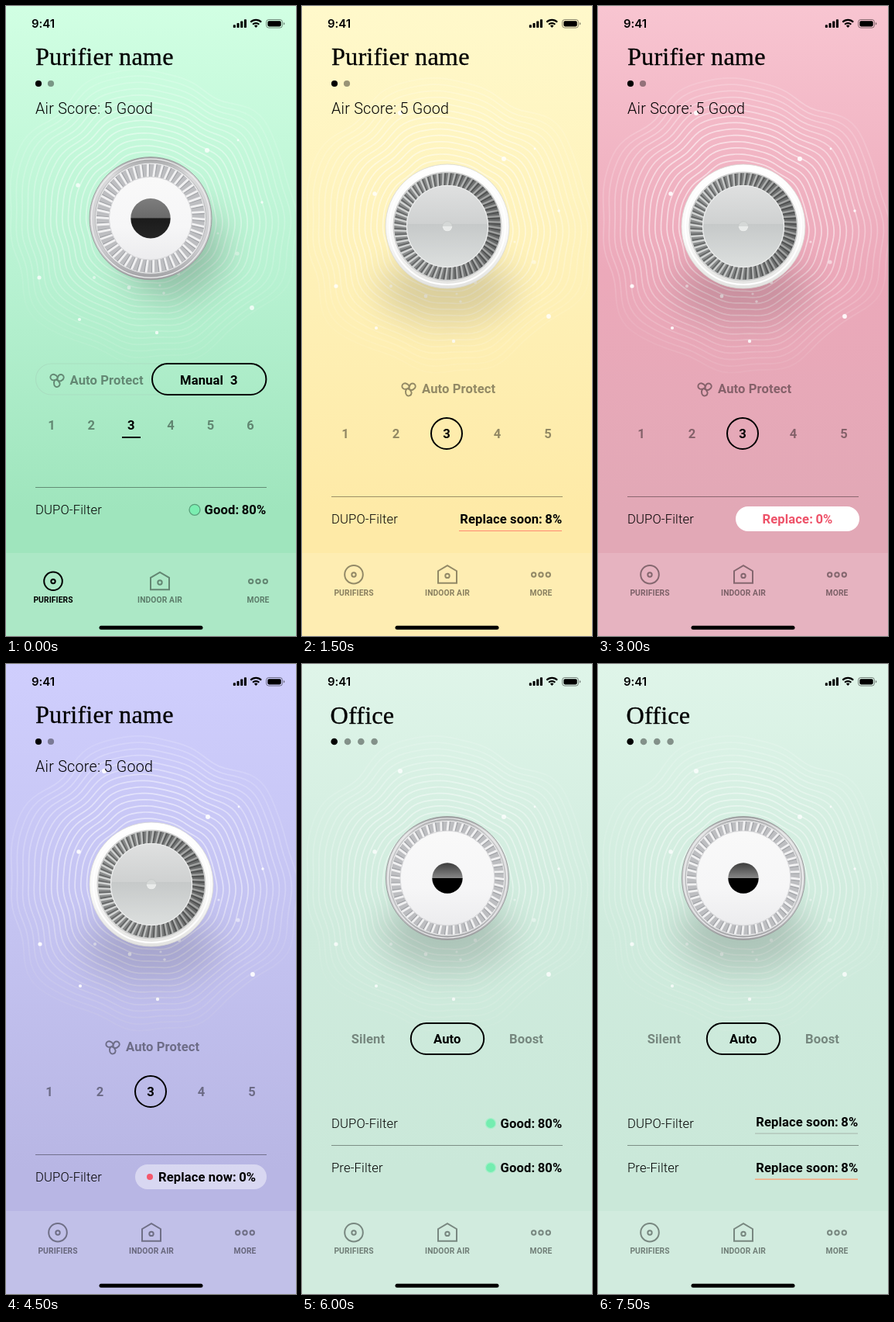
An HTML page for the animation above (8 s loop, 375 px wide and 812 px high).

```html
<!DOCTYPE html>
<html lang="en">
<head>
<meta charset="utf-8">
<title>Air purifier</title>
<style>
  html, body { margin: 0; width: 100%; height: 100%; overflow: hidden; }
  svg { display: block; width: 375px; height: 812px; }
  text { font-family: Roboto, Inter, sans-serif; font-size: 16.6px; font-weight: 700; letter-spacing: .1px; }
  .title { font-family: "Liberation Serif", serif; font-weight: 400; font-size: 32.3px; letter-spacing: .15px; stroke: #000; stroke-width: .3px; }
  .light { font-weight: 300; letter-spacing: .15px; }
  .score { font-weight: 300; font-size: 19.7px; letter-spacing: .25px; }
  .tab { font-size: 10.3px; font-weight: 600; }
  .clock { font-family: Inter, sans-serif; font-size: 15px; font-weight: 600; letter-spacing: -.05px; }
</style>
</head>
<body>
<svg id="stage" viewBox="0 0 375 812" xmlns="http://www.w3.org/2000/svg"></svg>
<script>
const LOOP = 8000, HOLD = 1500;
const FILTER = 'DUPO-Filter';
const stage = document.getElementById('stage');

// Drawing helpers; a thin space follows colons
const text = (x, y, str, o = {}) =>
  `<text x="${x}" y="${y}" class="${o.cls || ''}" text-anchor="${o.at || 'start'}" fill="${o.fill || '#000'}" opacity="${o.op || 1}">${String(str).replace(': ', ':\u2009')}</text>`;
const circle = (x, y, r, fill, extra = '') => `<circle cx="${x}" cy="${y}" r="${r}" fill="${fill}" ${extra}/>`;
const rect = (x, y, w, h, r, fill, extra = '') =>
  `<rect x="${x}" y="${y}" width="${w}" height="${h}" rx="${r}" fill="${fill}" ${extra}/>`;
const line = (x1, x2, y, color, w = 1, extra = '') =>
  `<path d="M${x1} ${y}H${x2}" stroke="${color}" stroke-width="${w}" ${extra}/>`;
const pen = (w, color = '#000') => `stroke="${color}" stroke-width="${w}"`;
const times = (n, fn) => Array.from({ length: n }, (_, i) => fn(i)).join('');
const stops = list => list.map(([at, color, op = 1]) =>
  `<stop offset="${at}" stop-color="${color}" stop-opacity="${op}"/>`).join('');
const vertical = (id, ...list) =>
  `<linearGradient id="${id}" x1="0" y1="0" x2="0" y2="1">${stops(list)}</linearGradient>`;

function defs(s) {
  const [top, mid, low] = s.bg;
  return `<defs>
    ${vertical('bg', [0, top], [.42, mid], [.8, low], [1, low])}
    ${vertical('rim', [0, '#a0a1a3'], [.15, '#dadadb'], [.75, '#cccccf'], [1, '#a0a0a3'])}
    ${vertical('disc', [0, '#f9f9f9'], [.6, '#f6f6f7'], [1, '#ececee'])}
    ${vertical('shell', [0, '#ffffff'], [.6, '#f8f8f7'], [1, '#e3e3e1'])}
    ${vertical('cap', [0, '#dfe0e0'], [.47, '#cfd1d1'], [.475, '#c6c9c9'], [1, '#dcdfde'])}
    ${vertical('lens', [0, '#7d7d7d'], [.49, '#6a6a6a'], [.5, '#1b1b1b'], [1, '#252525'])}
    ${vertical('dark', [0, '#3c3c3c'], [.49, '#868686'], [.5, '#000'], [1, '#000'])}
    <linearGradient id="shade">${stops([[.1, '#000', 0], [1, '#000', .25]])}</linearGradient>
    <linearGradient id="wave" gradientUnits="userSpaceOnUse" x1="0" y1="90" x2="0" y2="480">
      ${stops([[0, '#fff', .6], [.5, '#fff', .55], [1, s.wave, .5]])}</linearGradient>
    <radialGradient id="fade" gradientUnits="userSpaceOnUse" cx="188" cy="284" r="205">
      ${stops([[0, '#fff'], [.6, '#fff'], [1, '#fff', .12]])}</radialGradient>
    <mask id="soft" maskUnits="userSpaceOnUse" x="-40" y="40" width="455" height="480">
      ${rect(-40, 40, 455, 480, 0, 'url(#fade)')}</mask>
    <filter id="blur" x="-60%" y="-60%" width="220%" height="220%"><feGaussianBlur stdDeviation="22"/></filter>
  </defs>`;
}

function ring(k) {
  const R = 84 + k * 7.9, a = .02 + k * .0018;
  let d = '';
  for (let i = 0; i < 150; i++) {
    const q = i / 150 * Math.PI * 2;
    const bump = Math.sin(3 * q + .9 + k * .03) * .4 + Math.sin(6 * q - .6) * .75 +
      Math.sin(10 * q + 1.7 + k * .07) * .4 + Math.sin(15 * q + k * .1) * .16;
    const r = R * (1 + a * bump);
    d += (i ? 'L' : 'M') + (188 + r * Math.cos(q)).toFixed(1) + ' ' + (284 + r * Math.sin(q)).toFixed(1);
  }
  return `<path d="${d}Z"/>`;
}
const rings = times(14, ring);

const sparks = [
  [127, 138, 3], [261, 197, 3], [301, 184, 1.4], [94, 242, 2.7], [332, 264, 1.7],
  [300, 330, 2.6, .5], [44, 361, 2.6], [115, 361, 2, .6], [160, 374, 2.4, .7], [200, 371, 1.6, .5],
  [205, 381, 1.8, .6], [96, 415, 2.1], [319, 400, 2.9], [196, 432, 2.2], [224, 356, 2.2, .6], [275, 304, 1.6, .5]
];

function waves(s) {
  const [dx, dy] = s.shift || [0, 0];
  const from = s.shift ? 1 : 0;
  return `<g transform="translate(${dx} ${dy})">
    <g mask="url(#soft)" fill="none" stroke="url(#wave)" stroke-width="1.7" opacity="${s.waveOp}">${rings}</g>
    ${sparks.slice(from).map(([x, y, r, op = .9]) => circle(x, y, r, '#fff', `opacity="${op * s.sparkOp}"`)).join('')}
  </g>`;
}

function shadow(x, y, rx, ry, op) {
  return `<ellipse cx="${x}" cy="${y}" rx="${rx}" ry="${ry}" opacity="${op}" filter="url(#blur)"/>`;
}

// Radial blades between r0 and r1, tilted by skew degrees
function blades(n, r0, r1, w, color, skew = 0, turn = 0) {
  return `<g stroke="${color}" stroke-width="${w}">` + times(n, i => {
    const a = (i * 360 / n + turn) * Math.PI / 180, b = a + skew * Math.PI / 180;
    const p = (r, q) => (r * Math.cos(q)).toFixed(2) + ' ' + (r * Math.sin(q)).toFixed(2);
    return `<path d="M${p(r0, a)}L${p(r1, b)}"/>`;
  }) + '</g>';
}

function eyeDevice(x, y, r, r0, r1, n, eye, fill) {
  const mid = (r0 + r1) / 2, span = r1 - r0;
  return `<g transform="translate(${x} ${y})">
    ${circle(0, 0, r, 'url(#rim)', pen(1, '#9b9d9e'))}
    ${circle(0, 0, r - 2.5, 'none', pen(1.2, '#f0f0f1'))}
    ${circle(0, 0, r1 + 1.6, '#ededee', pen(.8, '#aeb0b2'))}
    ${circle(0, 0, mid, 'none', pen(span, '#bdbec1'))}
    ${blades(n, r0, r1, 1.2, '#a0a2a6', 1, 1.8)}
    ${blades(n, r0, r1, 2.8, '#f1f1f2', 1)}
    ${circle(0, 0, r0, 'url(#disc)', pen(.8, '#d4d4d6'))}
    ${circle(0, 0, eye, fill)}
  </g>`;
}

function knobDevice() {
  return `<g transform="translate(188 284)">
    ${circle(0, 0, 80, 'url(#shell)', pen(.8, '#d9d9d4'))}
    ${circle(0, 0, 75, 'none', pen(2, '#fff'))}
    ${circle(0, 0, 70, '#dcdddc', pen(.8, '#c4c5c4'))}
    ${circle(0, 0, 61, 'none', pen(15.5, '#8b8d8d'))}
    ${blades(56, 53, 68.6, 1.7, '#666868', 2, 2.2)}
    ${blades(56, 53, 69.5, 2.3, '#d2d4d3', 2)}
    ${circle(0, 0, 61, 'none', pen(16, 'url(#shade)'))}
    ${circle(0, 0, 52.5, 'url(#cap)', pen(1.2, '#eceded'))}
    ${circle(0, 0, 6.3, '#d5d8d7', pen(.6, '#c0c3c2'))}
    <path d="M-6.3 0A6.3 6.3 0 0 0 6.3 0Z" fill="#e9ebea"/>
  </g>`;
}

function fan(x, y) {
  const lobe = 'M0 1C4 -1 5.2 -4 4.6 -6.2A4.5 4.5 0 1 0 -2.6 -3.2';
  return `<g transform="translate(${x} ${y}) scale(.84)" fill="none" ${pen(2.3)} stroke-linecap="round" opacity=".42">` +
    [-60, 60, 180].map(a => `<path d="${lobe}" transform="rotate(${a})"/>`).join('') + '</g>';
}

function statusBar() {
  return text(33, 28, '9:41', { cls: 'clock' }) +
    times(4, i => rect(293.8 + i * 4.7, 24.2 - i * 2.3, 3.1, 3.9 + i * 2.3, .8, '#000')) +
    `<g fill="none" ${pen(2.2)}>
      <path d="M316.3 20.8A9.8 9.8 0 0 1 330.1 20.8"/><path d="M319.1 23.8A5.9 5.9 0 0 1 327.3 23.8"/>
    </g><path d="M320.9 25.6A3.5 3.5 0 0 1 325.5 25.6L323.2 28Z"/>` +
    rect(336.6, 17.5, 20.8, 10.6, 3.2, 'none', pen(1, '#0007')) +
    rect(338.3, 19.2, 17.4, 7.2, 1.8, '#000') +
    '<path d="M358.9 21v3.6q1.5-.6 1.5-1.8t-1.5-1.8Z" opacity=".5"/>';
}

function header(name, x, y, dots, r) {
  return text(x, y, name, { cls: 'title' }) +
    dots.map((cx, i) => circle(cx, 100, r, '#000', `opacity="${i ? .4 : 1}"`)).join('');
}

function tabs(xs, y, active) {
  const on = i => i === active ? 1 : .42;
  const eye = x => circle(x, y + .3, 2.7, 'none');
  const [a, b, c] = xs;
  const icons = [
    circle(a, y, 11.8, 'none') + eye(a),
    `<path d="M${b - 12} ${y + 11}V${y - 4.5}L${b} ${y - 11.5}L${b + 12} ${y - 4.5}V${y + 11}Z" fill="none"/>` +
      circle(b, y + 1.7, 2.7, 'none'),
    [-9.3, 0, 9.3].map(d => eye(c + d)).join('')
  ];
  return rect(0, 705, 375, 107, 0, '#fff', 'opacity=".13"') +
    icons.map((icon, i) => `<g ${pen(2)} opacity="${on(i)}">${icon}</g>`).join('') +
    ['PURIFIERS', 'INDOOR AIR', 'MORE'].map((str, i) =>
      text(xs[i], y + 27.5, str, { cls: 'tab', at: 'middle', op: i === active ? 1 : .46 })).join('') +
    rect(120.5, 798.7, 134, 5, 2.5, '#000');
}

const digits = (xs, y) => xs.map((x, i) =>
  text(x, y, i + 1, { at: 'middle', op: i === 2 ? 1 : .42 })).join('');
const divider = y => line(38, 337, y, '#000', 1, 'opacity=".38"');
const label = (y, str) => text(38, y, str, { cls: 'light' });
const value = (y, str) => text(336.3, y, str, { at: 'end' });
const score = () => text(38, 139, 'Air Score: 5 Good', { cls: 'score' });

function knobScene(status) {
  return shadow(188, 366, 88, 42, .14) + knobDevice() +
    header('Purifier name', 38, 76, [42, 58], 4.1) + score() +
    fan(138, 493) + text(155, 499, 'Auto Protect', { op: .42 }) +
    digits([56, 121.5, 187, 252.5, 318], 557) + circle(187, 551, 20, 'none', pen(2)) +
    divider(632.5) + label(667, FILTER) + status + tabs([67, 188, 309], 732.7);
}

function officeScene(rows) {
  return shadow(188, 350, 84, 46, .16) + eyeDevice(188, 276, 79.5, 61, 73, 48, 19.7, 'url(#dark)') +
    header('Office', 36.5, 77, [41.7, 59, 76.3, 93.6], 4.3) +
    rect(140.8, 463, 94.4, 40, 20, 'none', pen(2)) +
    ['Silent', 'Auto', 'Boost'].map((str, i) =>
      text(85.5 + i * 102.3, 489, str, { at: 'middle', op: i === 1 ? 1 : .42 })).join('') +
    label(598, FILTER) + label(655, 'Pre-Filter') + divider(620.5) + rows + tabs([67, 188, 309], 732.7);
}

function manualScene() {
  return shadow(216, 316, 66, 62, .2) + eyeDevice(187, 273.7, 79, 53.5, 70, 46, 25.7, 'url(#lens)') +
    header('Purifier name', 38, 76, [42, 58], 4.1) + score() +
    rect(38.5, 461, 298, 40, 20, 'none', pen(1.2, '#a9dfc1')) + fan(66, 481.5) +
    text(82.5, 487.5, 'Auto Protect', { op: .42 }) +
    rect(189, 461, 147.4, 40, 20, 'none', pen(2)) + text(225, 487.5, 'Manual') + text(290, 487.5, '3') +
    digits([59, 110.3, 161.7, 213, 264.5, 316], 545.5) + line(150, 174, 556, '#000', 2) +
    divider(620.5) + label(655, FILTER) +
    circle(244, 649.3, 7, '#7beeb1', pen(1.3, '#5a9f7b')) + value(655, 'Good: 80%') +
    tabs([61, 199, 326], 741.3, 0);
}

const good = y => circle(244, y - 5.8, 6.6, '#74edb0', pen(1.4, '#a9efcb')) + value(y, 'Good: 80%');
const soon = (y, lineY, color) => value(y, 'Replace soon: 8%') + line(203, 336, lineY, color, 1.2);

const mint = { bg: ['#dff5e9', '#cfebdd', '#cae8d9'], wave: '#e4efe5', waveOp: .72, sparkOp: .85 };
const scenes = [
  { bg: ['#d1ffe3', '#b8f2d2', '#9fe5bd'], wave: '#d5f3df', waveOp: .72, sparkOp: .85, shift: [-1, -11],
    body: manualScene },
  { bg: ['#fff9cb', '#fef1b8', '#feeaa7'], wave: '#fff6d4', waveOp: .8, sparkOp: .9,
    body: () => knobScene(soon(667, 676.5, '#ff8b72')) },
  { bg: ['#f8c5d1', '#eca9ba', '#e2a8b6'], wave: '#f0d0d6', waveOp: .95, sparkOp: 1,
    body: () => knobScene(rect(178, 645, 160, 32, 16, '#fff') +
      text(258, 667, 'Replace: 0%', { at: 'middle', fill: '#ee5269' })) },
  { bg: ['#cfcefd', '#c4c3f1', '#b8b6e4'], wave: '#dad6de', waveOp: .85, sparkOp: 1,
    body: () => knobScene(rect(167, 645, 170, 32, 16, '#fff', 'opacity=".45"') +
      circle(186, 661, 4, '#f4586c') + text(197, 667, 'Replace now: 0%')) },
  { ...mint, body: () => officeScene(good(598) + good(655)) },
  { ...mint, body: () => officeScene(soon(596, 605.2, '#aebfb5') + soon(655, 664.2, '#ff9a6c')) }
];

let shown = -1;
function render(ms) {
  const i = Math.floor((ms % LOOP) / HOLD);
  if (i === shown) return;
  shown = i;
  const s = scenes[i];
  stage.innerHTML = defs(s) + rect(0, 0, 375, 812, 0, 'url(#bg)') + waves(s) + s.body() + statusBar();
}

function tick() {
  render(performance.now());
  requestAnimationFrame(tick);
}
tick();
</script>
</body>
</html>
```
